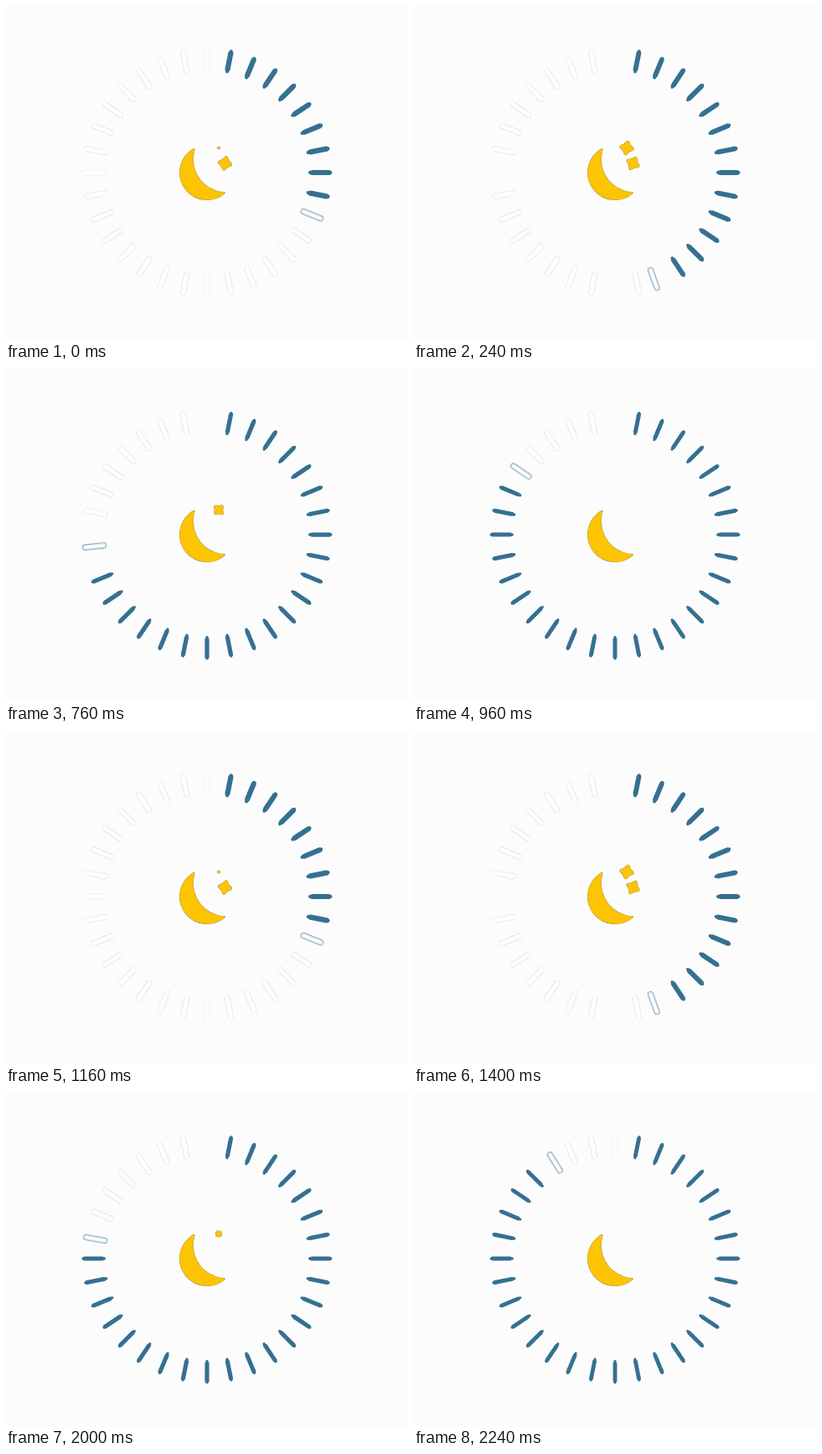
These frames come from a looping animation (480x399 px, 2280 ms). An HTML page with a canvas:

```html
<!DOCTYPE html>
<html lang="en">
<head>
<meta charset="utf-8">
<title>Moon dial</title>
<style>
html, body { margin: 0; width: 100%; height: 100%; overflow: hidden; background: #fcfcfc; }
canvas { display: block; }
</style>
</head>
<body>
<canvas id="stage" width="480" height="399"></canvas>
<script>
const ctx = document.getElementById('stage').getContext('2d');
const STEP = 40, LOOP = 2280, CYCLE = 29;
const TICKS = 32, GAP = 360 / TICKS;
const BLUE = '#357092', GOLD = '#fdc404', EDGE = '#99916a';
const rad = deg => deg * Math.PI / 180;
const clamp = v => Math.max(0, Math.min(1, v));

// Radial bar at a clockwise angle from the top.
function bar(deg, width, color, from, to) {
  const x = Math.sin(rad(deg)), y = -Math.cos(rad(deg)), cap = width / 2;
  ctx.lineWidth = width;
  ctx.strokeStyle = color;
  ctx.beginPath();
  ctx.moveTo(x * (from + cap), y * (from + cap));
  ctx.lineTo(x * (to - cap), y * (to - cap));
  ctx.stroke();
}

// Filled bar with narrower ends.
function blueTick(deg, width) {
  bar(deg, width * 0.65, BLUE, 121, 149.5);
  bar(deg, width, BLUE, 123, 148.5);
}

function ghost(n, i) {
  const axis = n % 8 === 0;
  if (axis && i > 0 && i < 25) return;
  bar(n * GAP, 6.8, axis ? '#e2f0f0' : '#cfdfe4', 121, 149.5);
  bar(n * GAP, 5.6, '#fdfefe', 121.4, 149.1);
}

function marker(deg) {
  bar(deg, 7.4, '#86a8b6', 120.5, 150);
  bar(deg, 5.8, '#d3e3ea', 121.3, 149.2);
  bar(deg, 3, '#ffffff', 122.5, 148);
}

// Gold fill with a thin dark rim around the current path.
function gild(line) {
  ctx.strokeStyle = EDGE;
  ctx.lineWidth = line + 0.8;
  ctx.stroke();
  ctx.fillStyle = ctx.strokeStyle = GOLD;
  ctx.lineWidth = line;
  ctx.stroke();
  ctx.fill();
}

function moon() {
  ctx.beginPath();
  ctx.arc(0, 0, 32, rad(49.2), rad(241));
  ctx.arc(23, -16, 40.3, rad(197.3), rad(93), true);
  ctx.closePath();
  gild(1.4);
}

// Four-point star whose points round off as it shrinks.
function star(x, y, i) {
  const size = 8.4 * Math.min(clamp((i + 1.2) / 6), clamp((24 - i) / 6));
  if (size <= 0) return;
  const cap = Math.min(2, size), r = size - cap;
  ctx.beginPath();
  for (let p = 0; p < 8; p++) {
    const a = rad(12 + (i - 6) * 2.5 + p * 45), d = p % 2 ? r * 0.55 : r;
    ctx.lineTo(x + d * Math.sin(a), y - d * Math.cos(a));
  }
  ctx.closePath();
  gild(cap * 2);
}

function draw(i) {
  ctx.setTransform(1, 0, 0, 1, 0, 0);
  ctx.fillStyle = '#fcfcfc';
  ctx.fillRect(0, 0, 480, 399);
  ctx.translate(240, 199);
  ctx.lineCap = ctx.lineJoin = 'round';

  const angle = 112 + 8 * i, head = Math.round(angle / GAP);
  for (let n = 1; n <= TICKS; n++) {
    if (n < head) blueTick(n * GAP, 6.2 - 0.05 * i);
    else if (n > head) ghost(n, i);
  }
  marker(angle);
  moon();
  star(14, -29.5, i);
  star(21.5, -11, i + 6);
}

const start = performance.now();
function tick() {
  const t = (performance.now() - start) % LOOP;
  draw(Math.floor(t / STEP) % CYCLE);
  requestAnimationFrame(tick);
}
tick();
</script>
</body>
</html>
```
